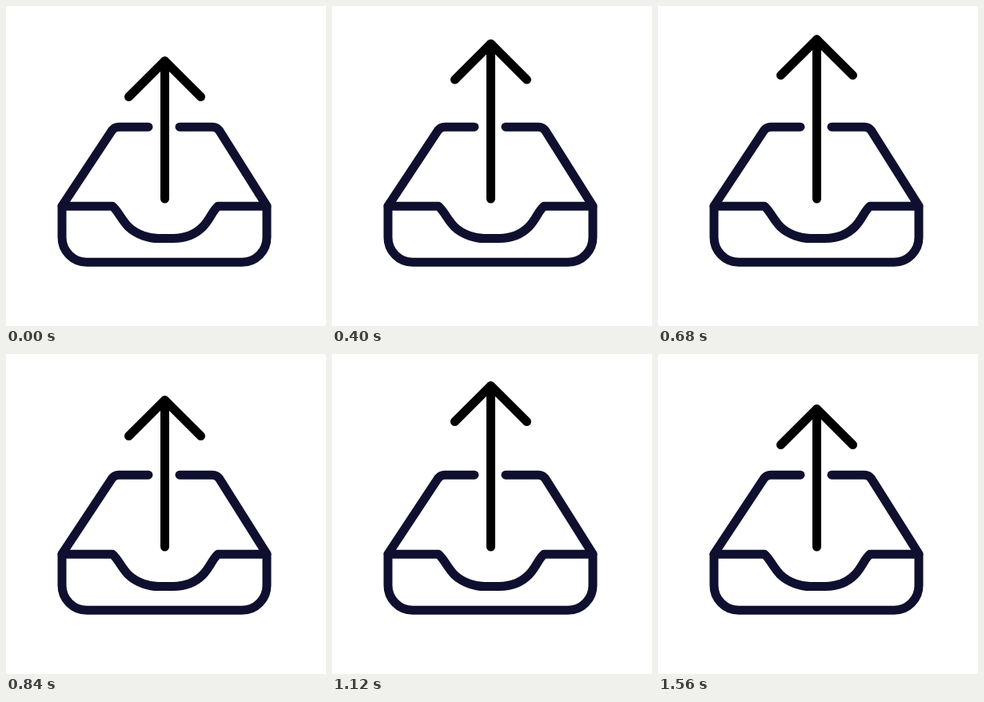
An HTML page for the animation above (1640 ms loop, 400 by 400 pixels).

```html
<!DOCTYPE html>
<html lang="en">
<head>
<meta charset="utf-8">
<title>Outbox</title>
<style>
  html, body { margin: 0; width: 100%; height: 100%; overflow: hidden; background: #fff; }
  svg { display: block; width: 100vw; height: 100vh; }
  path { fill: none; stroke-width: 11; stroke-linecap: round; stroke-linejoin: round; }
  .tray { stroke: #0f0f2f; }
  .arrow { stroke: #000; }
</style>
</head>
<body>
<svg viewBox="0 0 400 400">
  <g class="tray">
    <path d="M178 151.2H141Q135.500 151.200 132.500 155.500L70 250"/>
    <path d="M217 151.200H258Q263.500 151.200 266.500 155.500L326 250"/>
    <path d="M70 250.300H133C140 256 144 267 153 276C164 286.500 180 290.500 190 290.500H209C222 290.500 236 286 246 276C255 267 258 256 265 250.300H326V289A31 31 0 0 1 295 320.300H101A31 31 0 0 1 70 289Z"/>
  </g>
  <path class="arrow" id="shaft"/>
  <path class="arrow" id="head" d="M153.500 113.500L198.500 68.700L243.500 113.500"/>
</svg>
<script>
  const LOOP = 1640, STEP = 40, LAST = 39;
  // [step, lift of the arrow head]
  const keys = [[0, 0], [7, 29], [12, 17.5], [15.5, 29], [22.8, 8], [28, 29], [32.5, 5.5], [39, 0]];
  const shaft = document.getElementById('shaft');
  const head = document.getElementById('head');

  const ease = p => (1 - Math.cos(Math.PI * p)) / 2;

  function lift(step) {
    const i = Math.max(1, keys.findIndex(k => k[0] >= step));
    const [s0, y0] = keys[i - 1];
    const [s1, y1] = keys[i];
    return y0 + (y1 - y0) * ease((step - s0) / (s1 - s0));
  }

  function draw(ms) {
    const step = Math.min(LAST, Math.floor((ms % LOOP) / STEP));
    const y = lift(step);
    head.setAttribute('transform', `translate(0 ${-y})`);
    shaft.setAttribute('d', `M198.500 241V${68.7 - y}`);
  }

  const start = performance.now();
  function tick() {
    draw(performance.now() - start);
    requestAnimationFrame(tick);
  }
  draw(0);
  requestAnimationFrame(tick);
</script>
</body>
</html>
```
